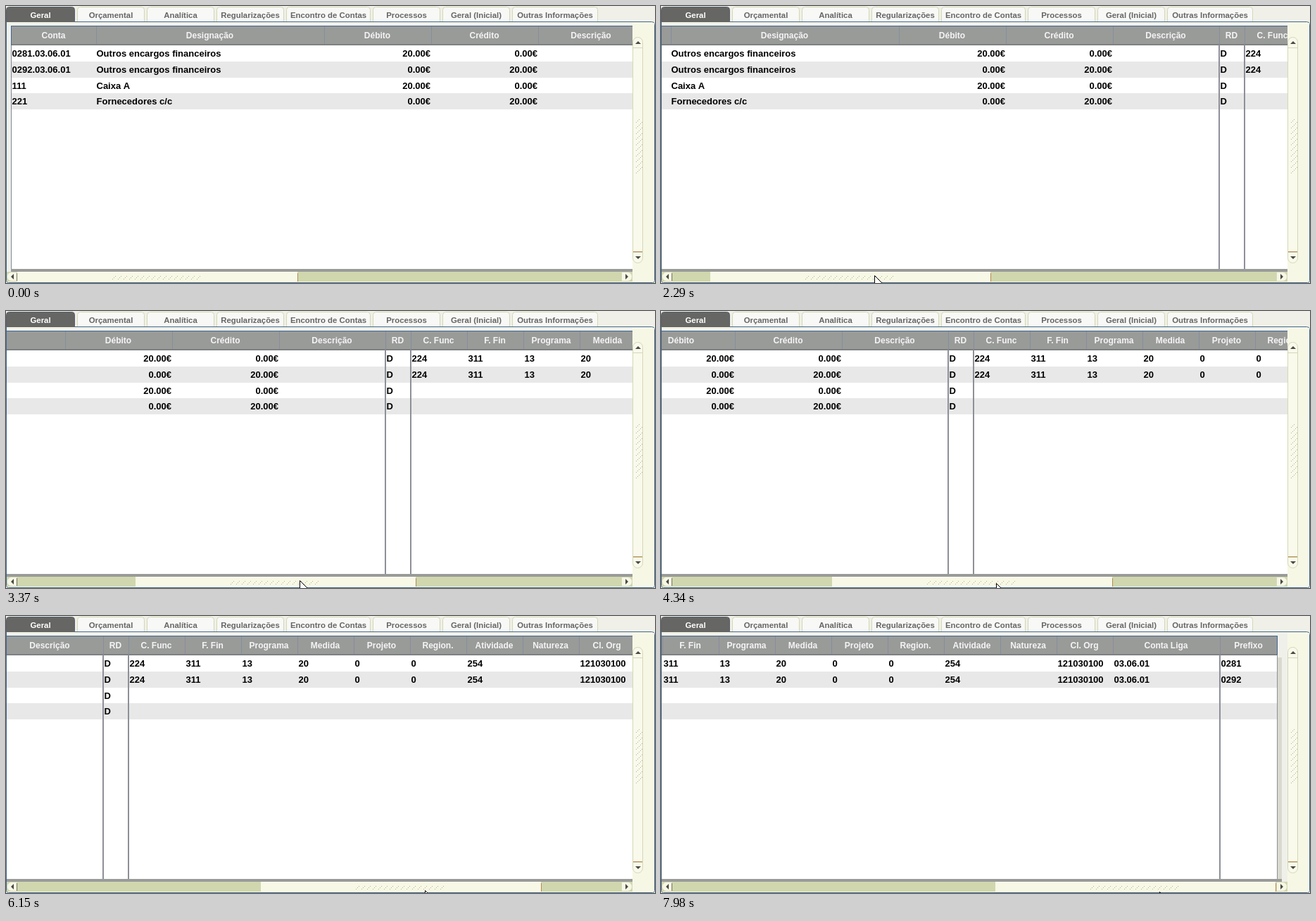
Recreate the animation shown at these times as an HTML page with a canvas. Size 922 by 394 pixels, loop 8 s.

```html
<!DOCTYPE html>
<html lang="pt">
<head>
<meta charset="utf-8">
<style>
html, body { margin: 0; width: 100%; height: 100%; overflow: hidden; background: #f0f0e8; }
canvas { display: block; }
</style>
</head>
<body>
<canvas id="stage" width="922" height="394"></canvas>
<script>
const g = document.getElementById('stage').getContext('2d');
const FONT = '"Liberation Sans", Arial, sans-serif';
const LOOP = 8000;
const CREAM = '#f7f7e6', OLIVE = '#d0d7ae', EDGE = '#d3d8b4', GREY = '#999b99';
const BLUE = '#3f6791', RUST = '#b88a4c', DARK = '#666664', ARROW = '#4a4a42';

// label, width
const tabs = [
  ['Geral', 98], ['Orçamental', 96], ['Analítica', 96], ['Regularizações', 96],
  ['Encontro de Contas', 120], ['Processos', 96], ['Geral (Inicial)', 96], ['Outras Informações', 122]
];

// title, width, cells
const both = v => [v, v];
const fee = 'Outros encargos financeiros';
const columns = [
  ['Conta', 120, ['0281.03.06.01', '0292.03.06.01', '111', '221']],
  ['Designação', 324, [fee, fee, 'Caixa A', 'Fornecedores c/c']],
  ['Débito', 152, ['20.00€', '0.00€', '20.00€', '0.00€']],
  ['Crédito', 152, ['0.00€', '20.00€', '0.00€', '20.00€']],
  ['Descrição', 151, []],
  ['RD', 36, ['D', 'D', 'D', 'D']],
  ['C. Func', 80, both('224')], ['F. Fin', 80, both('311')],
  ['Programa', 80, both('13')], ['Medida', 80, both('20')],
  ['Projeto', 80, both('0')], ['Region.', 80, both('0')],
  ['Atividade', 80, both('254')], ['Natureza', 80, []],
  ['Cl. Org', 80, both('121030100')], ['Conta Liga', 152, both('03.06.01')],
  ['Prefixo', 82, ['0281', '0292']]
];
const ruled = ['RD', 'C. Func', 'Prefixo'];
const rowTops = [56, 79, 102, 124];

// time, table scroll, steps to the next key
const keys = [
  [0, 0, 1], [1460, 4, 5], [1840, 42, 6], [2290, 114, 14], [3370, 368, 7],
  [3910, 466, 1], [4060, 476, 1], [4230, 485, 2], [4340, 499, 8], [4980, 607, 5],
  [5370, 674, 1], [5690, 688, 6], [6150, 769, 2], [6290, 795, 1], [6440, 808, 1],
  [6520, 821, 1], [6690, 834, 8], [7290, 936, 2], [7520, 957, 6], [7980, 1021, 1]
];

function scrollAt(t) {
  const i = keys.findLastIndex(k => k[0] <= t);
  const [t0, s0, n] = keys[i], [t1, s1] = keys[i + 1] || [LOOP, s0];
  return Math.round(s0 + (s1 - s0) * Math.floor((t - t0) / (t1 - t0) * n) / n);
}

function thumbAt(scroll) {
  const lead = scroll > 0 && scroll < 600 ? 3 : 0;
  return Math.round(16 + scroll * .4495 + lead);
}

// sweeps in from the right, then holds on to the thumb
function pointerAt(t, scroll, thumb) {
  if (scroll) return [thumb + 233, Math.round(scroll < 400 ? 382.6 : 386.6 + (scroll - 400) * .009)];
  if (t < 210) return [715, 400];
  const k = Math.min(12, Math.floor((t - 210) / 77.5));
  return [
    Math.round(249 + 466 * (1 - k / 12) ** 2.2),
    Math.round(383 - 27 * Math.sin(Math.PI * Math.min(1, k / 10.5)))
  ];
}

function box(color, x, y, w, h) {
  g.fillStyle = color;
  g.fillRect(x, y, w, h);
}

function roundBox(fill, edge, x, y, w, h, radii) {
  g.beginPath();
  g.roundRect(x + .5, y + .5, w - 1, h - 1, radii);
  g.fillStyle = fill;
  g.fill();
  g.strokeStyle = edge;
  g.lineWidth = 1;
  g.stroke();
}

function text(s, x, y, size, color, align) {
  g.font = `bold ${size}px ${FONT}`;
  g.textAlign = align;
  g.fillStyle = color;
  g.fillText(s, x, y);
}

// small triangle pointing along (dx, dy)
function arrow(x, y, dx, dy) {
  g.beginPath();
  g.moveTo(x + 4 * dx, y + 4 * dy);
  g.lineTo(x + 4 * dy, y + 4 * dx);
  g.lineTo(x - 4 * dy, y - 4 * dx);
  g.fillStyle = ARROW;
  g.fill();
}

// dotted slashes along a scroll thumb
function grip(x, y, count, dx, dy) {
  for (let i = 0; i < count; i++)
    for (let k = 0; k < 3; k++)
      box('#b3b391', x + i * dx + 2 * k, y + i * dy + 5 - 2 * k, 1, 1);
}

function drawTabs() {
  let x = 0;
  tabs.forEach(([label, width], i) => {
    roundBox(i ? '#f8f8f6' : DARK, i ? EDGE : '#56606a', x, 1, width, 24, [4, 4, 0, 0]);
    text(label, x + width / 2, 17, 11.4, i ? '#666' : '#fff', 'center');
    x += width + 3;
  });
}

function drawTable(scroll) {
  g.save();
  g.beginPath();
  g.rect(1, 24, 889, 354);
  g.clip();
  box('#f0f0ea', 1, 24, 889, 354);

  const start = 8 - scroll, end = 1897 - scroll, width = end - start;
  box('#d9d9d0', end, 59, 6, 319);
  box('#fff', start, 55, width, 319);
  box('#e8e8e8', start, rowTops[1], width, 23);
  box('#e8e8e8', start, rowTops[3], width, 23);
  box(GREY, start, 28, width, 27);
  box('#7e8082', start, 54, width, 2);
  box(BLUE, start, 28, width, 1);
  box(BLUE, start - 1, 28, 1, 28);
  box(BLUE, end - 1, 28, 1, 27);
  box('#808894', start - 1, 56, 1, 318);
  box('#8f918f', end - 1, 56, 1, 318);

  let x = start;
  columns.forEach(([title, w, cells], i) => {
    if (i) box('#858e9c', x, 29, 1, 25);
    if (ruled.includes(title)) box('#8e9098', x - 1, 55, 2, 319);
    text(title, x + w / 2 - .5, 46, 12, '#f4f4f4', 'center');
    const money = title === 'Débito' || title === 'Crédito';
    const cellX = money ? x + w - 1 : x + (i < 2 ? .5 : 1.5);
    cells.forEach((cell, r) => text(cell, cellX, rowTops[r] + 16, 13, '#000', money ? 'right' : 'left'));
    x += w;
  });
  box(GREY, start - 1, 374, width + 7, 4);
  g.restore();
}

function drawVerticalBar() {
  box(CREAM, 890, 24, 31, 368);
  roundBox('#f9f9ec', EDGE, 890, 44, 15, 322, 7);
  box(EDGE, 891, 59, 13, 1);
  box(RUST, 891, 349, 13, 1);
  box(EDGE, 891, 350, 13, 1);
  arrow(898, 54, 0, -1);
  arrow(898, 356, 0, 1);
  grip(895, 160, 10, 0, 8);
  grip(899, 164, 9, 0, 8);
}

function drawHorizontalBar(thumb) {
  box(OLIVE, 1, 378, 889, 14);
  roundBox(CREAM, EDGE, 1, 378, 15, 14, [7, 0, 0, 7]);
  roundBox(CREAM, EDGE, 874, 378, 16, 14, [0, 7, 7, 0]);
  box('#75755f', 15, 380, 1, 11);
  arrow(11, 385, -1, 0);
  arrow(880, 385, 1, 0);
  box('#f8f8e6', thumb, 378, 398, 14);
  box('#fffff4', thumb, 378, 398, 1);
  box(RUST, thumb + 398, 380, 1, 12);
  grip(thumb + 135, 383, 16, 8, 0);
}

const pointer = new Path2D('M.5 .5v16l4-3.5 2.5 5.5 2.5-1-2.5-5.5h5z');

function drawPointer(x, y) {
  g.save();
  g.translate(x, y);
  g.fillStyle = '#fff';
  g.fill(pointer);
  g.strokeStyle = '#000';
  g.lineWidth = 1;
  g.stroke(pointer);
  g.restore();
}

function draw(now) {
  const t = now % LOOP, scroll = scrollAt(t), thumb = thumbAt(scroll);
  box('#f0f0e8', 0, 0, 922, 394);
  drawTabs();
  roundBox(CREAM, BLUE, 0, 22, 922, 372, [0, 4, 3, 3]);
  box(DARK, 1, 21, 97, 2);
  drawTable(scroll);
  drawVerticalBar();
  drawHorizontalBar(thumb);
  drawPointer(...pointerAt(t, scroll, thumb));
  requestAnimationFrame(draw);
}
requestAnimationFrame(draw);
</script>
</body>
</html>
```
